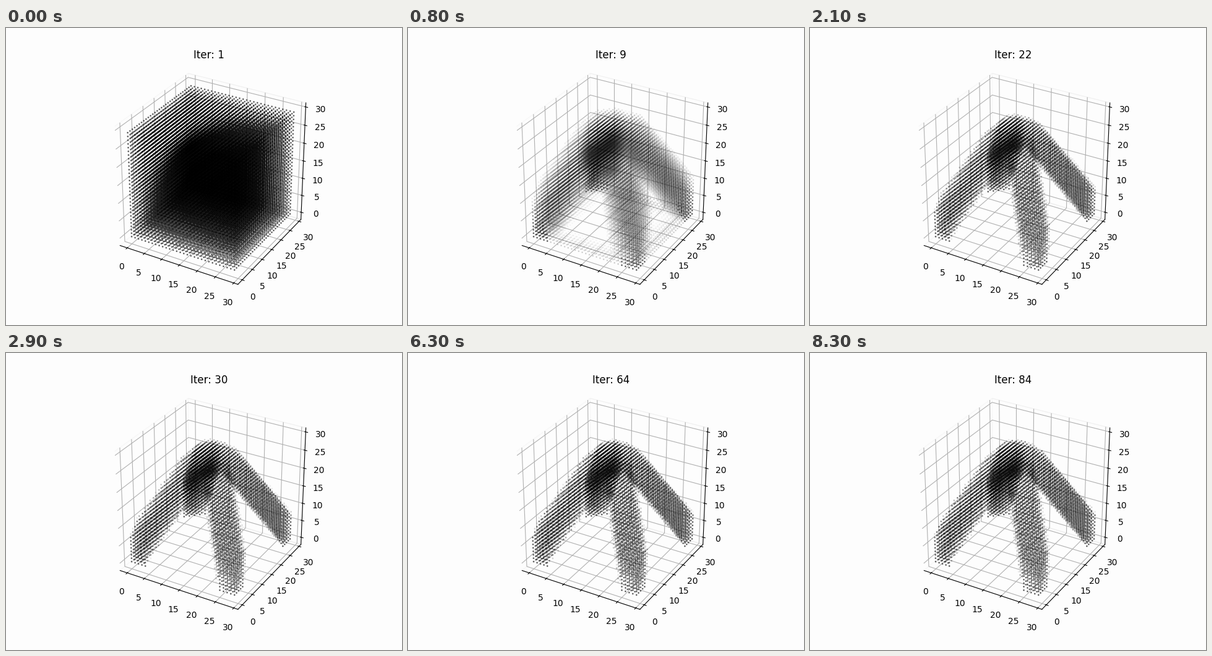
Recreate the animation shown at these times as a matplotlib script. Size 640 px wide and 480 px high, loop 8400 ms.

```python
import numpy as np
import matplotlib.pyplot as plt
from matplotlib.animation import FuncAnimation

N = 30          # cells per side
STEPS = 84
PAPER = "#fdfdfd"

fig = plt.figure(figsize=(6.4, 4.8), dpi=100, facecolor=PAPER)
ax = fig.add_subplot(projection="3d", facecolor=PAPER)
ax.set_box_aspect((1, 1, 1))

# 5 % data margin, then 1/48 of the range on each side
pad = 0.05 * (N - 1)
pad += (N - 1 + 2 * pad) / 48
for set_lim in (ax.set_xlim, ax.set_ylim, ax.set_zlim):
    set_lim(-pad, N - 1 + pad)
for axis in (ax.xaxis, ax.yaxis, ax.zaxis):
    axis.pane.fill = False

grid = np.indices((N, N, N)).reshape(3, -1).astype(float)
gx, gy, gz = grid
mid = (N - 1) / 2


def leg_distance():
    """Signed distance to four slanted legs that meet under the top centre."""
    x, y = abs(gx - mid), abs(gy - mid)
    run = mid - (x + y) / 2                 # steps inward from the corner
    side = abs(x - y) / np.sqrt(2) - 3.4
    top = np.minimum(np.minimum(7 + 1.94 * run, 31.4 - 0.8 * np.hypot(x, y)), 29)
    low = np.minimum(1.75 + 2.04 * (run - 2.7), 22)
    rise = 0.58 * np.maximum(gz - top - 0.5, low - 0.5 - gz)
    r = 1.6                                 # rounding of the cross-section
    a, b = side + r, rise + r
    dist = np.hypot(np.maximum(a, 0), np.maximum(b, 0))
    return dist + np.minimum(np.maximum(a, b), 0) - r, run


dist, run = leg_distance()
foot = (gz <= 2) & (run <= 2)
edge = np.minimum(mid - abs(gx - mid), mid - abs(gy - mid))
rim = np.where(gz <= 1, np.clip(1 - edge / 6, 0, 1), 0)
phase = np.random.default_rng(4).uniform(0, 2 * np.pi, dist.size)


def density(n):
    """Cell density after n steps: a full block that sharpens into legs."""
    blur = 0.7 + 4.3 * np.exp((9 - n) / 5)
    wobble = 0.12 * np.sin(phase + 0.15 * n) if n > 9 else 0
    d = np.clip(0.5 - (dist + wobble) / blur, 0, 1)
    d = np.maximum(d, 1 - 0.2 * (n - 1))
    d = np.maximum(d, 0.25 * rim * np.clip((13 - n) / 4, 0, 1))
    d[foot & (dist < 0.3)] = 1
    return d


dots = None


def draw(i):
    global dots
    if dots is not None:
        dots.remove()
    d = density(i + 1)
    show = d > 0.04
    rgba = np.zeros((show.sum(), 4))
    rgba[:, 3] = 0.5 * d[show]
    dots = ax.scatter(*grid[:, show], s=1, c=rgba, depthshade=False)
    ax.set_title(f"Iter: {i + 1}")


anim = FuncAnimation(fig, draw, frames=STEPS, interval=100,
                     init_func=lambda: None, repeat=True, repeat_delay=0)
plt.show()
```
